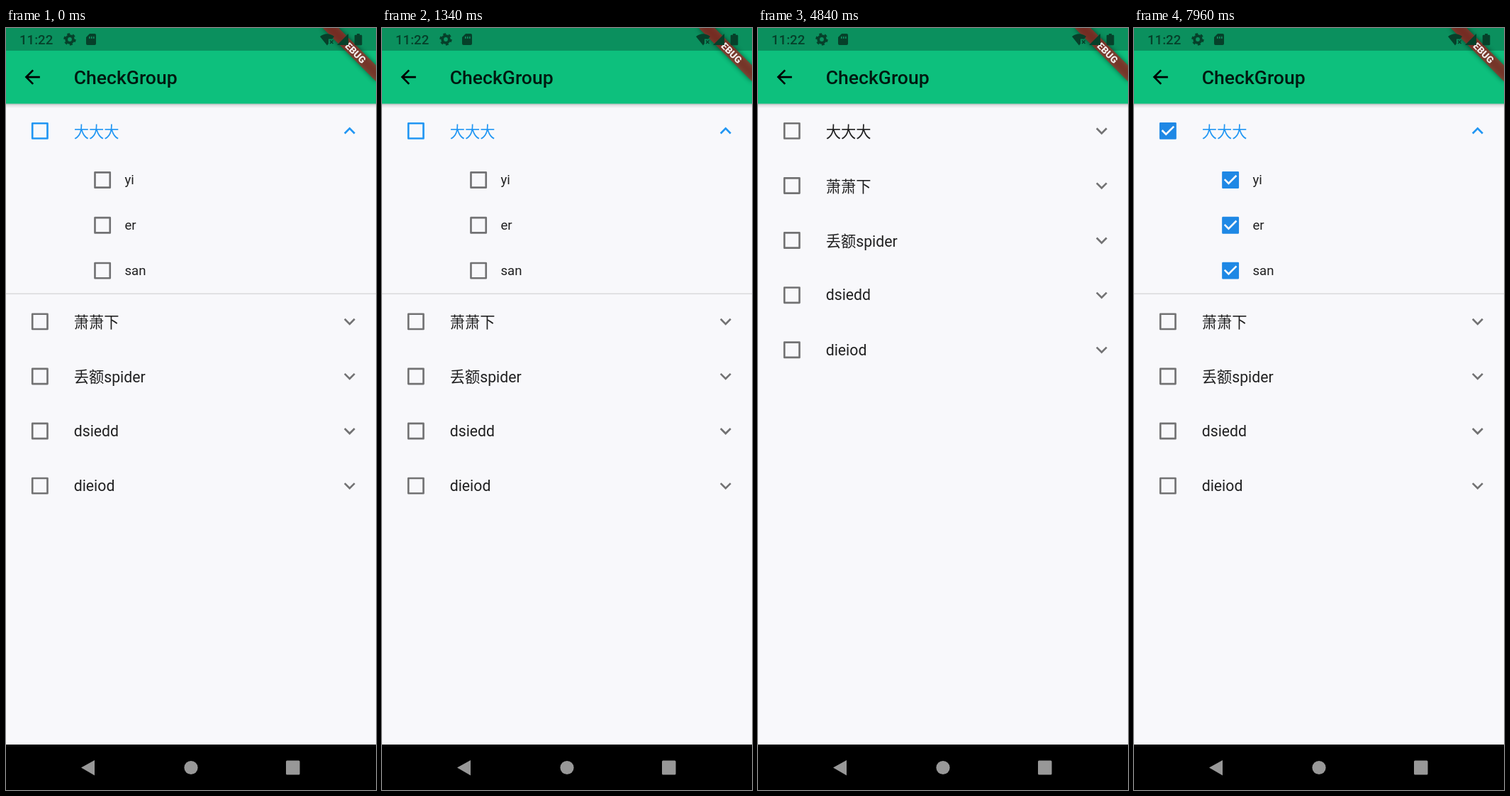
Animation, 522 px wide and 1073 px high, one loop 8000 ms. Source, as an HTML page:

```html
<!DOCTYPE html>
<html lang="zh">
<head>
<meta charset="utf-8">
<style>
html, body { margin: 0; width: 100%; height: 100%; overflow: hidden; background: #f8f8fb }
svg { display: block; font-family: Roboto, "Noto Sans CJK SC", "Noto Sans CJK JP", sans-serif }
.label { font-size: 16px; fill: rgba(0,0,0,.87) }
.child .label { font-size: 14px }
.icon { fill: rgba(0,0,0,.54) }
</style>
</head>
<body>
<svg width="522" height="1073" viewBox="0 0 522 1073">
  <defs>
    <path id="blank" d="M19 5v14H5V5h14m0-2H5c-.8 0-1.4.6-1.4 1.4H3V19c0 1.1.9 2 2 2h14c1.1 0 2-.9 2-2V5c0-1.1-.9-2-2-2z"/>
    <path id="box" fill-rule="evenodd" d="M4 3H20Q21 3 21 4V20Q21 21 20 21H4Q3 21 3 20V4Q3 3 4 3ZM5 5V19H19V5Z"/>
    <path id="checked" d="M4 3H20Q21 3 21 4V20Q21 21 20 21H4Q3 21 3 20V4Q3 3 4 3ZM10 17L19 8 17.59 6.58 10 14.17 6.41 10.59 5 12Z" fill-rule="evenodd"/>
    <path id="more" d="M16.59 8.59L12 13.17 7.41 8.59 6 10l6 6 6-6z"/>
    <clipPath id="clip"><rect id="window" y="137" width="393" height="144"/></clipPath>
    <linearGradient id="shade" x2="0" y2="1">
      <stop stop-opacity=".3"/><stop offset=".35" stop-opacity=".1"/><stop offset="1" stop-opacity="0"/>
    </linearGradient>
    <filter id="blur" x="-50%" y="-200%" width="200%" height="500%"><feGaussianBlur stdDeviation="3"/></filter>
  </defs>

  <!-- app, in density-independent units -->
  <g transform="scale(1.3292)">
    <g id="list"></g>
    <rect y="80" width="393" height="5" fill="url(#shade)"/>
    <rect width="393" height="80.2" fill="#0dc07d"/>
    <rect width="393" height="24" fill="#0b905e"/>
    <path transform="translate(16 40)" d="M20 11H7.83l5.59-5.59L12 4l-8 8 8 8 1.41-1.41L7.83 13H20v-2z"/>
    <text x="72" y="59.1" font-size="20" font-weight="500" fill="rgba(0,0,0,.87)">CheckGroup</text>
    <g transform="translate(392.73) rotate(45)">
      <rect x="-40" y="28" width="80" height="12" opacity=".5" filter="url(#blur)"/>
      <rect x="-40" y="28" width="80" height="12" fill="#b71c1c" opacity=".627"/>
      <text y="37.6" font-size="10.2" font-weight="900" text-anchor="middle" fill="#fff" fill-opacity=".9">DEBUG</text>
    </g>
  </g>

  <!-- status bar -->
  <g fill="#06402a">
    <text x="19" y="23" font-size="18.6" font-weight="500">11:22</text>
    <g fill="none" stroke="#06402a">
      <circle cx="90" cy="16" r="4.8" stroke-width="3.8"/>
      <circle cx="90" cy="16" r="7.4" stroke-width="2.6" stroke-dasharray="3.87"/>
    </g>
    <path fill-rule="evenodd" d="M118 8h7q2 0 2 2v12q0 2-2 2h-10q-2 0-2-2V13zM117 12v3h1.6v-3zM120 12v3h1.6v-3zM123 12v3h1.6v-3z"/>
    <path d="M443 12Q453 4.500 463 12L460 15.500H455V22L453 24.500Z"/>
    <path d="M457 17.500l4.500 4.500m0-4.500l-4.500 4.500" stroke="#06402a" stroke-width="1.500"/>
    <path d="M467 24L483 8V24Z"/>
    <path d="M495 8h4v1.700h2q1.300 0 1.300 1.300v12q0 1.300-1.300 1.300h-8q-1.300 0-1.300-1.300V11q0-1.300 1.300-1.300h2z"/>
  </g>

  <!-- navigation bar -->
  <rect y="1009" width="522" height="64"/>
  <g fill="#989898">
    <path d="M106 1041.500L125 1031V1052.500Z"/>
    <circle cx="261" cy="1041.500" r="9.600"/>
    <rect x="395" y="1031.500" width="19.500" height="20" rx="1.500"/>
  </g>
</svg>
<script>
const LOOP = 8000, FADE = 200;
const CLOSE = 3370, OPEN = 4900, CHECK = 6500;
const BLUE = [33, 150, 243, 1], GREY = [0, 0, 0, .54], INK = [0, 0, 0, .87];
const CHILD_HEIGHT = 144;
const $ = id => document.getElementById(id);

const icon = (name, x, y, cls = '') =>
  `<use class="icon ${cls}" href="#${name}" x="${x - 12}" y="${y - 12}"/>`;
const label = (text, x, y) => `<text class="label" x="${x}" y="${y}">${text}</text>`;

// Han glyphs make a line box that sits slightly lower.
const row = (text, y) => icon('box', 36, y, 'check') +
  label(text, 72, y + (/[^a-z]/.test(text) ? 6.5 : 5.5)) +
  `<g class="arrow">${icon('more', 364.73, y)}</g>`;
const child = (text, i) => {
  const y = 161 + 48 * i;
  return icon('box', 102.4, y, 'check') + label(text, 126, y + 4.8);
};

$('list').innerHTML = `
  <g id="head">${row('大大大', 109)}</g>
  <g clip-path="url(#clip)"><g id="children" class="child">${['yi', 'er', 'san'].map(child).join('')}</g></g>
  <rect id="line" width="393" height="1" fill-opacity=".14"/>
  <g id="rest">${['萧萧下', '丢额spider', 'dsiedd', 'dieiod'].map((s, i) => row(s, 167 + 58 * i)).join('')}</g>`;

const headBox = document.querySelector('#head .check');
const headText = document.querySelector('#head .label');
const headArrow = document.querySelector('#head .arrow');
const boxes = [headBox, ...document.querySelectorAll('#children .check')];

const ramp = (t, start) => Math.min(1, Math.max(0, (t - start) / FADE));
const mix = (a, b, k) => `rgba(${a.map((v, i) => v + (b[i] - v) * k)})`;
const easeIn = p => p ** 1.7;
const openness = (t, delay) => t < OPEN + delay ? 1 - ramp(t, CLOSE + delay) : ramp(t, OPEN + delay);

function draw(now) {
  const t = now % LOOP;
  const p = openness(t, 0), k = easeIn(p);
  const height = CHILD_HEIGHT * k;
  const checked = t >= CHECK;

  $('window').setAttribute('height', height);
  $('children').setAttribute('transform', `translate(0 ${(height - CHILD_HEIGHT) / 2})`);
  $('rest').setAttribute('transform', `translate(0 ${height})`);
  $('line').setAttribute('y', 137 + height);
  $('line').style.opacity = 1 - easeIn(1 - p);
  headArrow.setAttribute('transform', `rotate(${180 * k} 364.73 109)`);

  const tint = mix(GREY, BLUE, k);
  headArrow.firstChild.style.fill = tint;
  // The title recolours only once the tile has settled.
  headText.style.fill = mix(INK, BLUE, openness(t, FADE));
  for (const box of boxes) {
    box.setAttribute('href', checked ? '#checked' : '#box');
    box.style.fill = checked ? '#1e88e5' : box === headBox ? tint : '';
  }
  requestAnimationFrame(draw);
}
draw(0);
</script>
</body>
</html>
```
